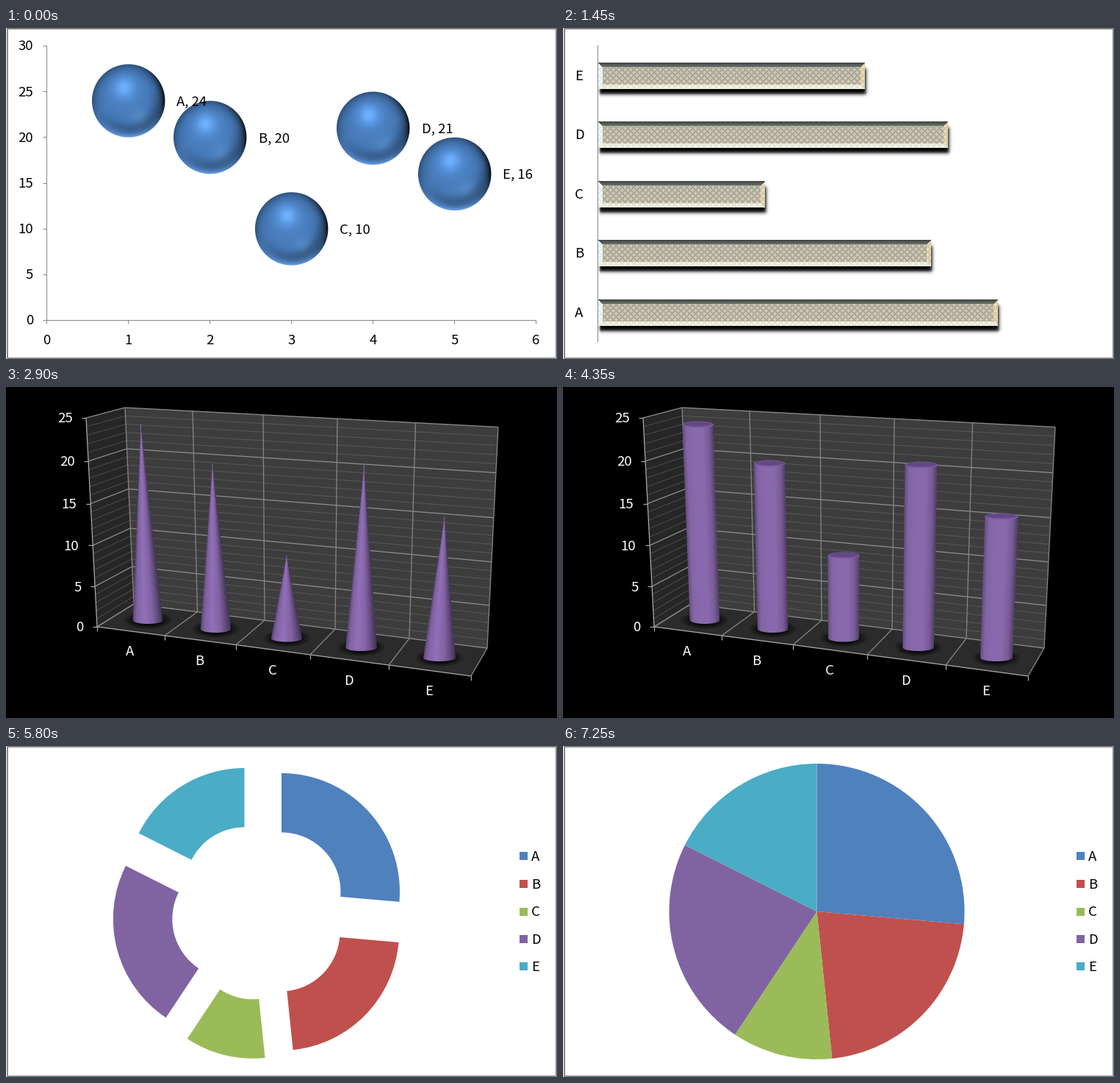
A matplotlib script for the animation above (8 s loop, 750 px wide and 450 px high).

```python
import numpy as np
import matplotlib.pyplot as plt
from matplotlib.animation import FuncAnimation
from matplotlib.patches import Ellipse, Polygon, Rectangle, Wedge

W, H, DPI = 750, 450, 100
TICK = 50                      # ms per animation step
LOOP, HOLD = 8000, 1450        # ms per loop, ms per chart
NAMES = "ABCDE"
VALUES = np.array([24, 20, 10, 21, 16])
COLORS = ["#4f81bd", "#c0504d", "#9bbb59", "#8064a2", "#4bacc6"]

plt.rcParams["font.family"] = "Noto Sans CJK JP"
fig = plt.figure(figsize=(W / DPI, H / DPI), dpi=DPI)
X, Y = np.meshgrid(np.arange(W) + 0.5, np.arange(H) + 0.5)


def pt(px):
    return px * 72 / DPI


def stage(back="white", frame=True):
    ax = fig.add_axes([0, 0, 1, 1])
    ax.set(xlim=(0, W), ylim=(H, 0))
    ax.axis("off")
    ax.add_patch(Rectangle((0, 0), W, H, fc=back, lw=0, zorder=0))
    if frame:
        ax.add_patch(Rectangle((2, 1), 747, 448, fill=False, ec="#868686",
                               lw=pt(2), zorder=9))
    return ax


def line(ax, p, q, color="#868686", width=1.0, z=2):
    ax.plot([p[0], q[0]], [p[1], q[1]], color=color, lw=pt(width), zorder=z,
            solid_capstyle="butt")


def label(ax, x, y, s, ha="left", color="black"):
    ax.text(x, y + 6.3, s, ha=ha, va="baseline", color=color,
            fontsize=pt(18.6), zorder=8)


def picture(ax, rgba, z):
    ax.imshow(np.clip(rgba, 0, 1), extent=(0, W, H, 0), aspect="auto",
              interpolation="nearest", zorder=z)
    ax.set(xlim=(0, W), ylim=(H, 0))


def over(img, rgb, alpha):
    """Composite a colour layer onto an RGBA image in place."""
    a = alpha[..., None]
    base = img[..., 3:]
    out = a + base * (1 - a)
    img[..., :3] = (rgb * a + img[..., :3] * base * (1 - a)) / np.maximum(out, 1e-6)
    img[..., 3:] = out


def mix(a, b, k):
    return np.array(a) * (1 - k) + np.array(b) * k


# --- bubbles ---------------------------------------------------------------

def sphere(img, cx, cy, radius=49.7):
    u, v = (X - cx) / radius, (Y - cy) / radius
    r = np.minimum(np.hypot(u, v), 1)
    low = np.clip(v, 0, 1)
    right = np.clip(u, 0, 1)

    def blob(cu, cv, size):
        return np.exp(-((u - cu) ** 2 + (v - cv) ** 2) / size)

    belt = np.exp(-((r - 0.76) / 0.18) ** 2) * np.clip(0.35 * u + 0.94 * v, 0, 1)
    shade = (1 + 0.24 * blob(-0.12, -0.35, 0.14)
             - 0.32 * belt
             - 0.36 * r ** 6 * (1 - low)
             - 0.60 * r ** 5 * right ** 2 * (1 - 0.7 * low)
             + 0.22 * r ** 9 * low ** 2)
    glow = (0.09 * blob(-0.12, -0.37, 0.05) + 0.05 * blob(0.32, 0.45, 0.06)
            + 0.09 * r ** 9 * low ** 2)
    rgb = np.array([72, 124, 187]) / 255 * shade[..., None] + glow[..., None]
    over(img, np.clip(rgb, 0, 1),
         np.clip((1 - np.hypot(u, v)) * radius + 0.5, 0, 1))


def bubble_chart():
    ax = stage()
    x0, y0, dx, dy = 55, 397, 111, 12.43
    line(ax, (x0, 24), (x0, y0))
    line(ax, (x0, y0), (x0 + 6 * dx, y0))
    for n in range(7):
        x, y = x0 + dx * n, y0 - 5 * dy * n
        line(ax, (x0 - 5, y), (x0, y))
        line(ax, (x, y0), (x, y0 + 5))
        label(ax, 37, y, str(5 * n), "right")
        label(ax, x + 0.5, 424, str(n), "center")
    img = np.zeros((H, W, 4))
    for i, (name, val) in enumerate(zip(NAMES, VALUES), 1):
        x, y = x0 + dx * i, y0 - dy * val
        sphere(img, x + 0.7, y + 0.3)
        label(ax, x + 66.5, y + 0.5, f"{name}, {val}")
    picture(ax, img, 4)
    return ax


# --- bevelled bars -----------------------------------------------------------

def step(d, soft):
    return 1 / (1 + np.exp(-np.clip(d / soft, -40, 40)))


def lattice(pitch=8):
    """Soft-edged diagonal mesh, 1 on the wires and 0 between them."""
    def gap(s):
        return np.abs((s + pitch / 2) % pitch - pitch / 2)
    xi, yi = np.floor(X), np.floor(Y)
    return np.clip(1.6 - np.minimum(gap(xi + yi), gap(xi - yi)), 0, 1)[..., None]


def bevel_bar(img, top, right, left=48, tall=36, edge=6):
    bottom = top + tall
    shadow = (step(X - left - 2, 0.8) * step(right + 1.5 - X, 1.3)
              * step(Y - top - 8, 1.3) * step(bottom + 7 - Y, 1.3))
    over(img, np.zeros(3), shadow)

    mesh = lattice()
    k = np.clip((Y - top) / tall, 0, 1)[..., None]
    rgb = mix(mix([0.79, 0.76, 0.66], [0.86, 0.80, 0.67], k),
              [0.61, 0.63, 0.62], mesh)

    gaps = np.stack([Y - top, bottom - Y, X - left, right - X])
    inset = gaps.min(axis=0)
    side = np.argmin(gaps, axis=0)
    t = np.clip((Y - top) / edge, 0, 1)[..., None]
    dark = mix([0.24, 0.27, 0.26], [0.42, 0.44, 0.41], t)
    cream = mix([0.97, 0.96, 0.88], [0.86, 0.88, 0.83], mesh)
    pale = mix([0.97, 0.99, 0.98], [0.88, 0.93, 0.93], mesh)
    tan = mix([0.94, 0.87, 0.70], [0.79, 0.76, 0.66], mesh)
    for n, tone in enumerate((dark, cream, pale, tan)):
        rgb = np.where(((inset < edge) & (side == n))[..., None], tone, rgb)
    over(img, rgb, (inset > 0).astype(float))


def bar_chart():
    ax = stage()
    img = np.zeros((H, W, 4))
    for i, (name, val) in enumerate(zip(NAMES, VALUES)):
        top = int(369 - 80.5 * i)
        bevel_bar(img, top, round(48 + 22.67 * val))
        label(ax, 22, top + 17.5, name, "center")
    picture(ax, img, 4)
    line(ax, (47, 23), (47, 427), z=5)
    return ax


# --- solids in a room ----------------------------------------------------------

# (x, y) of apex and of base centre, with the base radius
SOLIDS = [((183.5, 51), (193, 317), 20.3), ((281, 104), (285.5, 329), 20.6),
          ((382, 229), (382, 341.5), 21), ((487.5, 106), (483.5, 354), 21.3),
          ((597, 176), (590, 368), 22)]
TOP_X = [162, 254, 350, 451, 557.5, 670]
BACK_X = [174, 260.5, 352, 448, 549, 655]
FRONT_X = [124, 216, 313, 414, 521, 633]
FRONT_Y = [326, 338, 350.5, 364, 378, 393]


def front(v):
    return 124 - 3 * v, 326 - 54.3 * v - 0.5 * v * v


def corner(v):
    return 174 - 2.4 * v, 295 - 50.2 * v - 0.64 * v * v


def far(v):
    return 655 + 3 * v, 355 - 57.6 * v - 0.5 * v * v


def along(p, q, x):
    return x, p[1] + (q[1] - p[1]) * (x - p[0]) / (q[0] - p[0])


def solid(img, top, base, radius, tapered):
    ry = 5
    k = np.clip((Y - top[1]) / (base[1] - top[1]), 0, 1.03)
    cx = top[0] + (base[0] - top[0]) * k
    half = np.maximum(radius * k, 0.7) if tapered else radius + 0.7 * (1 - k)
    u = (X - cx) / half
    arc = np.sqrt(np.clip(1 - u * u, 0, 1))
    mask = (np.clip((1 - np.abs(u)) * half + 0.5, 0, 1)
            * np.clip(base[1] + ry * arc - Y + 0.5, 0, 1)
            * np.clip(Y - top[1] + 0.5, 0, 1))
    stops = [-1, -0.75, -0.25, 0.3, 0.7, 1]
    if tapered:
        tones = [0.66, 0.93, 1.06, 0.94, 0.70, 0.48]
    else:
        tones = [0.72, 0.95, 1.0, 0.99, 0.86, 0.58]
    shade = np.interp(u, stops, tones)
    over(img, np.array([138, 106, 174]) / 255 * shade[..., None], mask)


def room(ax):
    def wall(pts, tone):
        ax.add_patch(Polygon(pts, fc=tone, lw=0, zorder=1))

    wall([front(0), front(5), corner(5), corner(0)], "#262626")
    wall([corner(0), corner(5), far(5), far(0)], "#3d3d3d")
    wall([front(0), corner(0), far(0), (633, 393)], "#2b2b2b")
    for n in range(26):
        v = n / 5
        major = n % 5 == 0
        width = 1.3 if major else 1
        line(ax, front(v), corner(v), "#8c8c8c" if major else "#4a4a4a", width)
        line(ax, corner(v), far(v), "#8c8c8c" if major else "#585858", width)
    for tx, bx, fx, fy in zip(TOP_X, BACK_X, FRONT_X, FRONT_Y):
        b = along(corner(0), far(0), bx)
        line(ax, along(corner(5), far(5), tx), b, "#858585", 1.3)
        line(ax, b, (fx, fy), "#858585", 1.3)
        line(ax, (fx, fy), (fx, fy + 6), "#a6a6a6", 1.3)
    ax.plot(FRONT_X, FRONT_Y, color="#a6a6a6", lw=pt(1.3), zorder=2)
    line(ax, front(0), front(5), "#a6a6a6", 1.3)
    for v in range(6):
        x, y = front(v)
        line(ax, (x - 6, y), (x, y), "#a6a6a6", 1.3)
        label(ax, x - 18.5, y, str(5 * v), "right", "white")
    for name, x, y in zip(NAMES, (169, 263.5, 362.5, 466.5, 576),
                          (359, 372, 385, 399, 413)):
        label(ax, x, y, name, "center", "white")


def room_chart(tapered):
    ax = stage("black", frame=False)
    room(ax)
    img = np.zeros((H, W, 4))
    for top, base, radius in SOLIDS:
        r = np.hypot((X - base[0]) / 32, (Y - base[1]) / 12)
        over(img, np.zeros(3), 0.75 * np.clip((1.05 - r) / 0.5, 0, 1))
        solid(img, top, base, radius, tapered)
        if not tapered:
            size = 2 * radius + 1.4
            ax.add_patch(Ellipse(top, size, 9, fc="#7d5da2", lw=0, zorder=5))
            ax.add_patch(Ellipse((top[0], top[1] - 0.6), size - 3, 6.4,
                                 fc="#624887", lw=0, zorder=6))
    picture(ax, img, 4)
    return ax


# --- ring and pie --------------------------------------------------------------

def wedge_chart(radius, width=None, burst=0):
    ax = stage()
    ends = np.cumsum(VALUES) / VALUES.sum() * 360 - 90
    starts = np.r_[-90, ends[:-1]]
    for i, (a, b) in enumerate(zip(starts, ends)):
        mid = np.radians((a + b) / 2)
        hub = 345.5 + burst * np.cos(mid), 225 + burst * np.sin(mid)
        ax.add_patch(Wedge(hub, radius, a, b, width=width, fc=COLORS[i],
                           lw=0, zorder=3))
        y = 150 + 37.5 * i
        ax.add_patch(Rectangle((699, round(y - 5.5)), 11, 11, fc=COLORS[i],
                               lw=0, zorder=3))
        label(ax, 715, y, NAMES[i])
    return ax


charts = [bubble_chart(), bar_chart(), room_chart(True), room_chart(False),
          wedge_chart(161, 80.5, 40), wedge_chart(201)]


def show(n):
    for i, ax in enumerate(charts):
        ax.set_visible(i == n * TICK // HOLD)
    return charts


anim = FuncAnimation(fig, show, frames=LOOP // TICK, interval=TICK,
                     init_func=lambda: show(0), repeat=True, repeat_delay=0,
                     blit=False)
plt.show()
```
